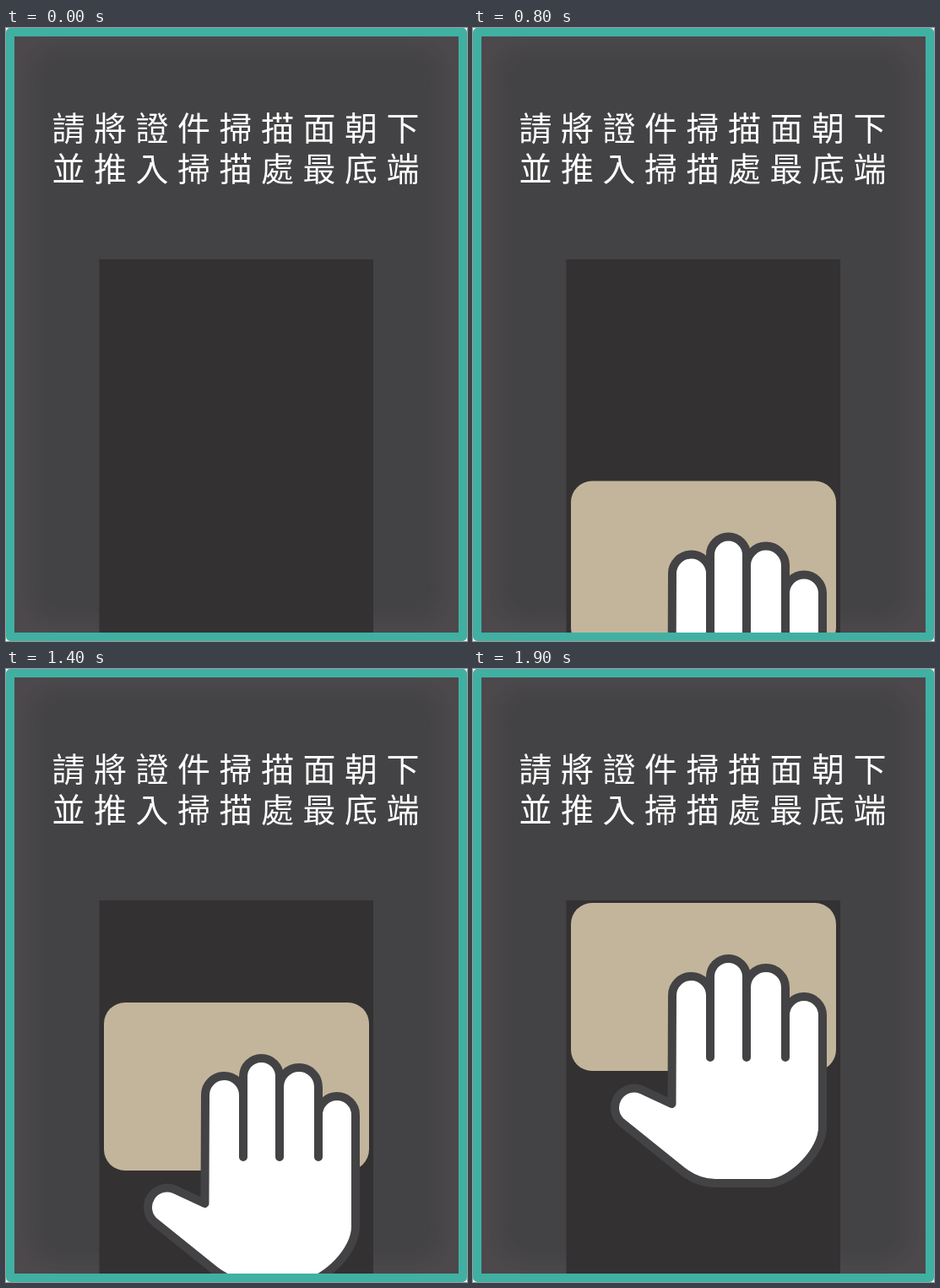
An HTML page that plays this animation: 546 by 726 pixels, repeating every 3.9 s.

```html
<!DOCTYPE html>
<html lang="zh-Hant">
<head>
<meta charset="utf-8">
<style>
html, body { margin: 0; width: 100%; height: 100%; overflow: hidden; background: #fff; }
svg { display: block; width: 546px; height: 726px; }
text {
  font-family: "Noto Sans CJK TC", "Noto Sans CJK", sans-serif;
  font-size: 39px; font-weight: 300; letter-spacing: 10.5px; fill: #fff;
}
</style>
</head>
<body>
<svg viewBox="0 0 546 726">
  <rect x="5" y="5" width="536" height="716" fill="#4c484b"/>
  <g id="shade"></g>
  <text x="54.5" y="132.5">請將證件掃描面朝下</text>
  <text x="54.5" y="181">並推入掃描處最底端</text>
  <rect x="110.5" y="274" width="324.5" height="446" fill="#333132"/>
  <g id="push">
    <rect x="116" y="277" width="314" height="199" rx="25" fill="#c3b59b"/>
    <path id="hand" fill="#fff" stroke="#434244" stroke-width="10"
      stroke-linejoin="round" stroke-linecap="round"/>
  </g>
  <rect x="5" y="5" width="536" height="716" fill="none" stroke="#40b0a3"
    stroke-width="10" stroke-linejoin="round"/>
</svg>
<script>
const LOOP = 3900, STEP = 100, STEPS = 19, RISE = 23.6;
const get = id => document.getElementById(id);

// Soft vignette built from nested rounded bands
const BANDS = 9;
const mix = (a, b, p) => Math.round(a + (b - a) * p);
let bands = '';
for (let i = 0; i < BANDS; i++) {
  const p = i / (BANDS - 1);
  const x = 16 + 28 * p, y = 10 + 27 * p;
  const color = `rgb(${mix(75, 67, p)},${mix(72, 66, p)},${mix(75, 68, p)})`;
  bands += `<rect x="${x}" y="${y}" width="${546 - 2 * x}" height="${726 - 2 * y}"` +
    ` rx="${48 - 20 * p}" fill="${color}"/>`;
}
get('shade').innerHTML = bands;

// Each finger: left edge, right edge, top; gaps run down to a common depth
const fingers = [[236, 281, 364], [281, 324, 343], [324, 370, 354], [370, 414, 388]];
const GAP_END = 460;
let d = 'M235.5 515';
fingers.forEach(([left, right, top], i) => {
  const r = (right - left) / 2;
  d += `L${left} ${top + r}A${r} ${r} 0 0 1 ${right} ${top + r}`;
  if (i < fingers.length - 1) d += `V${GAP_END}`;
});
d += 'V543C414 570 380 606 352 609H287C272 609 260 604 247 594' +
  'L176 537A23 23 0 0 1 199 498Z';
get('hand').setAttribute('d', d);

function draw(now) {
  const step = Math.min(STEPS, Math.floor((now % LOOP) / STEP));
  get('push').setAttribute('transform', `translate(0 ${(STEPS - step) * RISE})`);
}

const start = performance.now();
function tick() {
  draw(performance.now() - start);
  requestAnimationFrame(tick);
}
tick();
</script>
</body>
</html>
```
